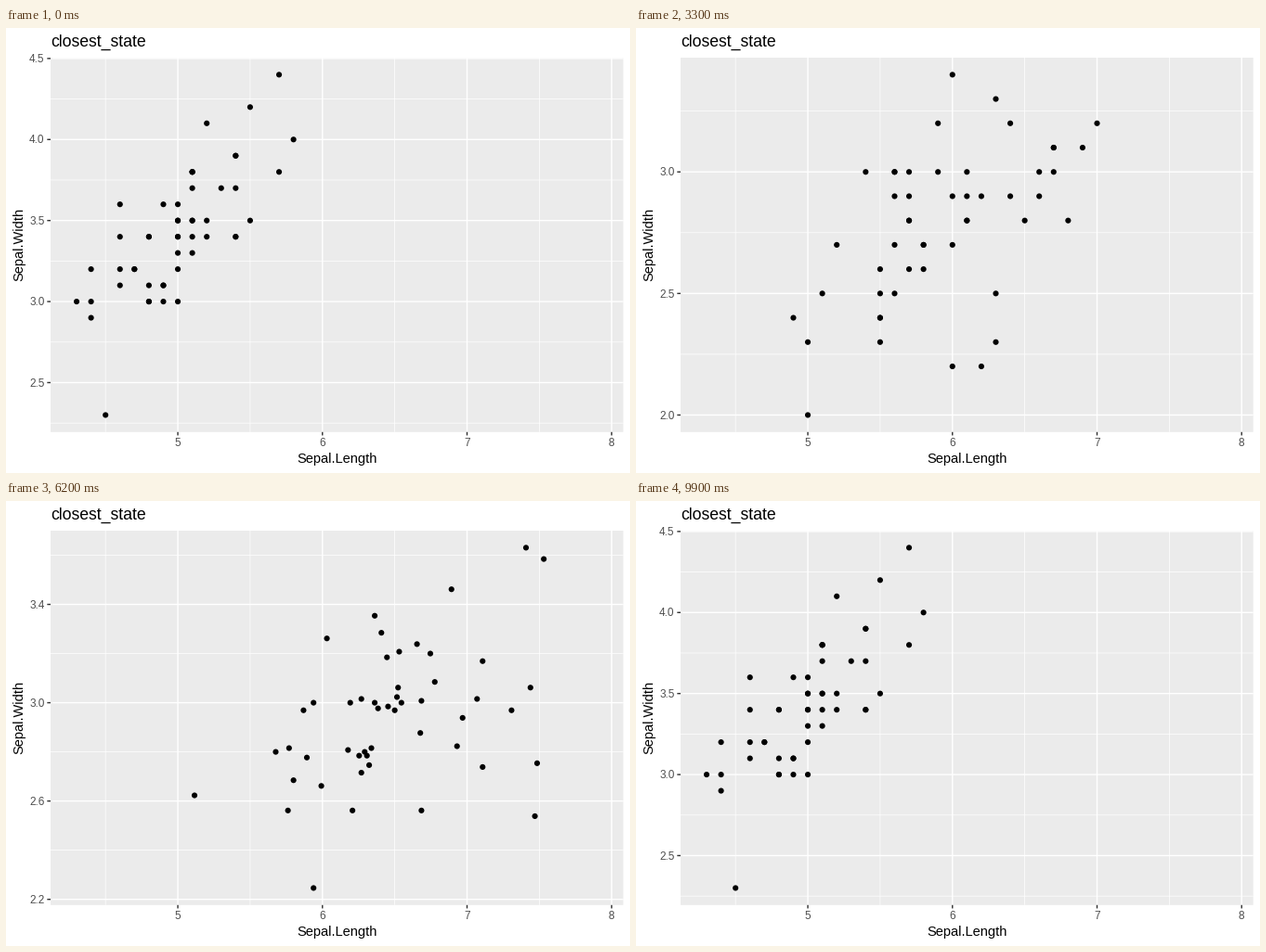
These frames come from a looping animation (672 by 480 pixels, 10000 ms). A matplotlib script:

```python
import math

import matplotlib.pyplot as plt
import numpy as np
from matplotlib.animation import FuncAnimation
from matplotlib.collections import LineCollection
from matplotlib.patches import Rectangle

plt.rcParams["font.family"] = "Liberation Sans"
plt.rcParams["path.snap"] = False

W, H, DPI = 672, 480, 96
LEFT, RIGHT, TOP, BOTTOM = 48.0, 664.7, 32.0, 435.8
TICK, GAP = 3.65, 2.93
N_FRAMES = 100

# Sepal length and width of each species, in tenths
SETOSA_L = [51, 49, 47, 46, 50, 54, 46, 50, 44, 49, 54, 48, 48, 43, 58, 57, 54,
            51, 57, 51, 54, 51, 46, 51, 48, 50, 50, 52, 52, 47, 48, 54, 52, 55,
            49, 50, 55, 49, 44, 51, 50, 45, 44, 50, 51, 48, 51, 46, 53, 50]
SETOSA_W = [35, 30, 32, 31, 36, 39, 34, 34, 29, 31, 37, 34, 30, 30, 40, 44, 39,
            35, 38, 38, 34, 37, 36, 33, 34, 30, 34, 35, 34, 32, 31, 34, 41, 42,
            31, 32, 35, 36, 30, 34, 35, 23, 32, 35, 38, 30, 38, 32, 37, 33]
VERSI_L = [70, 64, 69, 55, 65, 57, 63, 49, 66, 52, 50, 59, 60, 61, 56, 67, 56,
           58, 62, 56, 59, 61, 63, 61, 64, 66, 68, 67, 60, 57, 55, 55, 58, 60,
           54, 60, 67, 63, 56, 55, 55, 61, 58, 50, 56, 57, 57, 62, 51, 57]
VERSI_W = [32, 32, 31, 23, 28, 28, 33, 24, 29, 27, 20, 30, 22, 29, 29, 31, 30,
           27, 22, 25, 32, 28, 25, 28, 29, 30, 28, 30, 29, 26, 24, 24, 27, 27,
           30, 34, 31, 23, 30, 25, 26, 30, 26, 23, 27, 30, 29, 29, 25, 28]
VIRGI_L = [63, 58, 71, 63, 65, 76, 49, 73, 67, 72, 65, 64, 68, 57, 58, 64, 65,
           77, 77, 60, 69, 56, 77, 63, 67, 72, 62, 61, 64, 72, 74, 79, 64, 63,
           61, 77, 63, 64, 60, 69, 67, 69, 58, 68, 67, 67, 63, 65, 62, 59]
VIRGI_W = [33, 27, 30, 29, 30, 30, 25, 29, 25, 36, 32, 27, 30, 25, 28, 32, 30,
           38, 26, 22, 32, 28, 28, 27, 33, 32, 28, 30, 28, 30, 28, 38, 28, 28,
           26, 30, 34, 31, 30, 31, 31, 31, 27, 32, 33, 30, 25, 30, 34, 30]

STATES = [np.column_stack(pair) / 10 for pair in
          ((SETOSA_L, SETOSA_W), (VERSI_L, VERSI_W), (VIRGI_L, VIRGI_W))]
# (last still frame, first frame at rest in the next state)
MOVES = [(6, 33), (40, 66), (73, 99)]


def points_at(frame):
    """Linear tween between species, row by row, with holds between."""
    pts = STATES[0]
    for i, (start, end) in enumerate(MOVES):
        if frame > start:
            t = min(1, (frame - start) / (end - start))
            a, b = STATES[i], STATES[(i + 1) % 3]
            pts = a + (b - a) * t
    return pts


def expand(lo, hi):
    pad = 0.05 * (hi - lo)
    return lo - pad, hi + pad


def nice_breaks(lo, hi, m=5):
    """Extended Wilkinson labelling: returns first break, step and count."""
    best, result = -math.inf, None
    span = hi - lo
    for j in (1, 2, 3):
        for i, q in enumerate((1, 5, 2, 2.5, 4, 3)):
            simplicity = 1 - i / 5 - j + 1
            for k in range(2, 10):
                z0 = math.ceil(math.log10(span / (k + 1) / (j * q)))
                for z in (z0, z0 + 1):
                    step = j * q * 10.0 ** z
                    first = (math.floor(hi / step) - (k - 1)) * j
                    last = math.ceil(lo / step) * j
                    for s in range(first, last + 1):
                        a = s * step / j
                        b = a + step * (k - 1)
                        cover = 1 - 0.5 * ((hi - b) ** 2 + (lo - a) ** 2) / (0.1 * span) ** 2
                        r = (k - 1) / (b - a)
                        rt = (m - 1) / (max(b, hi) - min(a, lo))
                        density = 2 - max(r / rt, rt / r)
                        score = 0.25 * simplicity + 0.2 * cover + 0.5 * density
                        if score > best + 1e-10:
                            best, result = score, (a, step, k)
    return result


def axis_breaks(lo, hi):
    """Major and minor breaks that lie inside the limits."""
    a, step, k = nice_breaks(lo, hi)
    inside = lambda v: v[(v >= lo - 1e-9) & (v <= hi + 1e-9)]
    major = inside(a + step * np.arange(k))
    minor = inside(a + step * (np.arange(-1, k) + 0.5))
    return major, minor


def labels_for(values):
    digits = next(d for d in range(6)
                  if np.allclose(np.round(values, d), values, atol=1e-7, rtol=0))
    return [f"{v:.{digits}f}" for v in values]


X_LO, X_HI = expand(4.3, 7.9)


def px(x):
    return LEFT + (x - X_LO) / (X_HI - X_LO) * (RIGHT - LEFT)


def py(y, lo, hi):
    return BOTTOM - (y - lo) / (hi - lo) * (BOTTOM - TOP)


def v_lines(xs, y0, y1):
    return [[(x, y0), (x, y1)] for x in xs]


def h_lines(ys, x0, x1):
    return [[(x0, y), (x1, y)] for y in ys]


def pt(pixels):
    return pixels * 72 / DPI


fig = plt.figure(figsize=(W / DPI, H / DPI), dpi=DPI, facecolor="white")
ax = fig.add_axes([0, 0, 1, 1])
ax.set(xlim=(0, W), ylim=(H, 0))
ax.axis("off")
ax.add_patch(Rectangle((LEFT, TOP), RIGHT - LEFT, BOTTOM - TOP,
                       facecolor="#ebebeb", linewidth=0, zorder=0))


def line_set(color, width, zorder):
    lines = LineCollection([], colors=color, linewidths=pt(width), zorder=zorder)
    ax.add_collection(lines, autolim=False)
    return lines


minor_grid = line_set("white", 0.71, 1)
major_grid = line_set("white", 1.42, 2)
ticks = line_set("#333333", 1.42, 2)
dots = ax.scatter(np.zeros(50), np.zeros(50), s=pt(6.15) ** 2,
                  c=["black"] * 50, linewidths=0, zorder=3)

ax.text(LEFT, 20, "closest_state", size=13.2)
ax.text((LEFT + RIGHT) / 2, 469, "Sepal.Length", size=11, ha="center")
ax.text(18, (TOP + BOTTOM) / 2, "Sepal.Width", size=11, ha="center",
        va="baseline", rotation=90, rotation_mode="anchor")

x_major, x_minor = np.arange(5, 9), np.arange(4.5, 8)
for x in x_major:
    ax.text(px(x), 451, str(x), size=8.8, color="#4d4d4d", ha="center")
y_labels = [ax.text(LEFT - TICK - GAP, 0, "", size=8.8, color="#4d4d4d", ha="right")
            for _ in range(10)]


def update(frame):
    pts = points_at(frame)
    lo, hi = expand(pts[:, 1].min(), pts[:, 1].max())
    major, minor = axis_breaks(lo, hi)
    ys = py(major, lo, hi)

    minor_grid.set_segments(h_lines(py(minor, lo, hi), LEFT, RIGHT)
                            + v_lines(px(x_minor), TOP, BOTTOM))
    major_grid.set_segments(h_lines(ys, LEFT, RIGHT)
                            + v_lines(px(x_major), TOP, BOTTOM))
    ticks.set_segments(h_lines(ys, LEFT - TICK, LEFT)
                       + v_lines(px(x_major), BOTTOM, BOTTOM + TICK))
    dots.set_offsets(np.column_stack((px(pts[:, 0]), py(pts[:, 1], lo, hi))))

    for label in y_labels:
        label.set_text("")
    for label, text, y in zip(y_labels, labels_for(major), ys):
        label.set_text(text)
        label.set_y(y + 4.2)
    return []


anim = FuncAnimation(fig, update, frames=N_FRAMES, interval=100,
                     repeat=True, repeat_delay=0)
plt.show()
```
